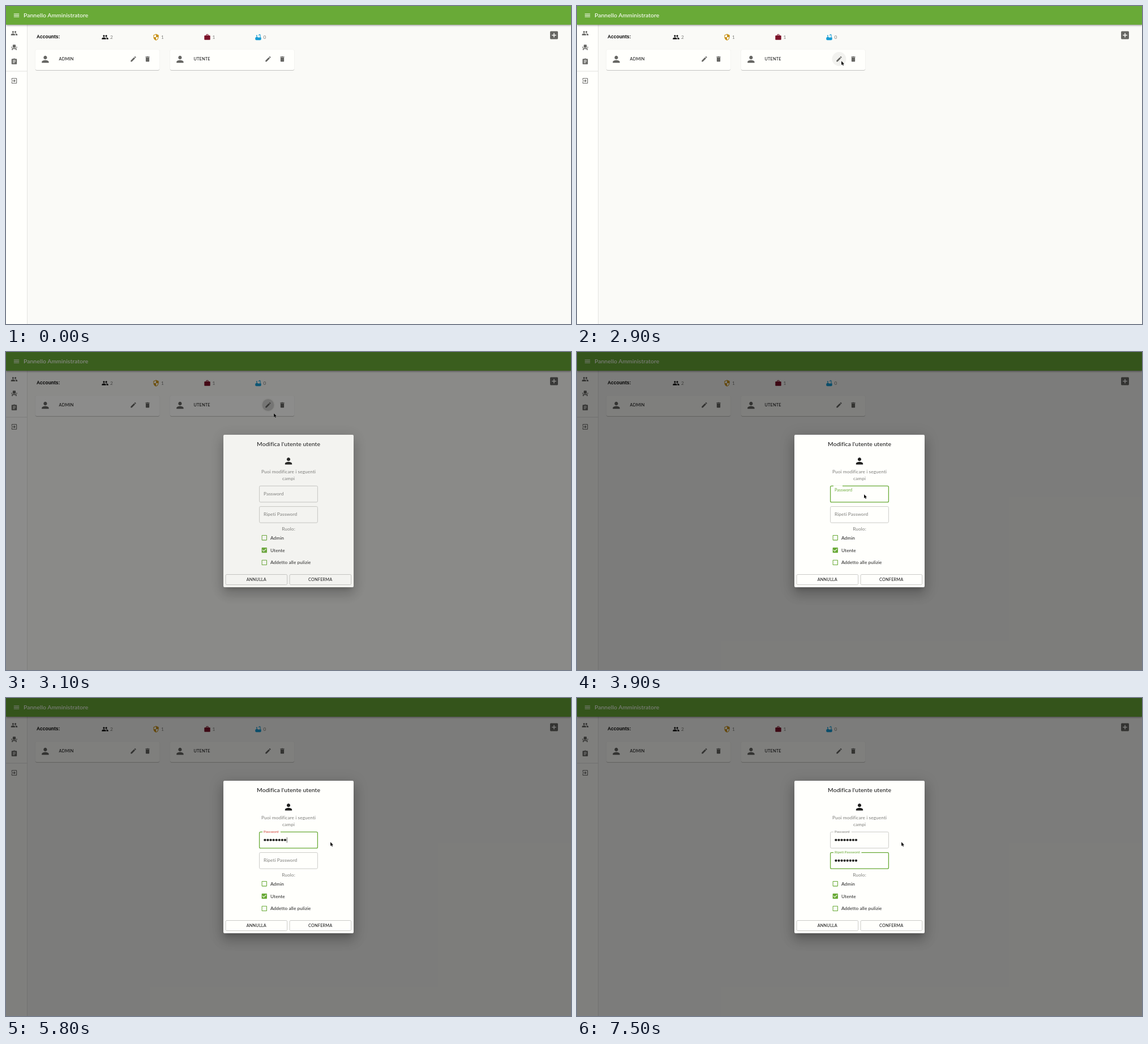
Recreate the animation shown at these times as an HTML page. Size 998 px wide and 561 px high, loop 8 s.

```html
<!DOCTYPE html>
<html lang="it">
<head>
<meta charset="utf-8">
<title>Pannello Amministratore</title>
<style>
html, body { margin: 0; width: 100%; height: 100%; overflow: hidden; background: #fafaf7; }
#stage { position: absolute; left: 0; top: 0; width: 998px; height: 561px; overflow: hidden; }
#stage div, #stage svg { position: absolute; }
svg { left: 0; top: 0; width: 998px; height: 561px; }
text { font-family: Lato, sans-serif; font-size: 8.32px; letter-spacing: .00938em; fill: #202020; white-space: pre; }
.h6 { font-size: 10.4px; font-weight: 500; letter-spacing: .0075em; }
.btn { font-size: 7.28px; font-weight: 500; letter-spacing: .02857em; }
.soft { fill: #7d7d7a; }
.mid { text-anchor: middle; }
#side { left: 0; top: 33px; width: 37px; height: 528px; background: #fffffc; border-right: 1px solid #e4e4e1; }
#bar { left: 0; top: 0; width: 998px; height: 33.3px; background: #69aa37;
  box-shadow: 0 1px 2px -.5px #0003, 0 2px 2.6px #00000024, 0 .5px 5px #0000001f; }
.card { top: 77px; width: 219px; height: 36px; border-radius: 2px; background: #fffffc;
  box-shadow: 0 1px .5px -.5px #0003, 0 .5px .5px #00000024, 0 .5px 1.6px #0000001f; }
#dim { left: 0; top: 0; width: 998px; height: 560.5px; background: rgba(0, 0, 0, .5); }
#dialog { left: 0; top: 0; width: 998px; height: 561px; }
#paper { left: 383.7px; top: 146px; width: 230.7px; height: 269px; border-radius: 2px; background: #fffffc;
  box-shadow: 0 5.7px 7.8px -3.6px #0003, 0 12.5px 19.8px 1.6px #00000024, 0 4.7px 24px 4.2px #0000001f; }
</style>
</head>
<body>
<div id="stage">
  <div id="side"></div>
  <div class="card" style="left:52px"></div>
  <div class="card" style="left:290px"></div>
  <div id="bar"></div>
  <svg id="page">
    <circle id="hover" cx="463" cy="93.5" r="12.5"/>
    <circle id="ripple" cx="463" cy="93.5"/>
    <path d="M0 115H37" stroke="#e0e0dd"/>
  </svg>
  <div id="dim"></div>
  <div id="dialog"><div id="paper"></div><svg id="form"></svg></div>
  <svg><path id="cursor" d="M0 0V7.2L1.7 5.7L2.8 8.2L4.1 7.6L3 5.2H5.2Z" fill="#000" stroke="#fff" stroke-opacity=".6" stroke-width=".35"/></svg>
</div>
<script>
const ICONS = {
  menu: 'M3 18h18v-2H3zm0-5h18v-2H3zm0-7v2h18V6z',
  people: 'M16 11c1.66 0 2.99-1.34 2.99-3S17.66 5 16 5c-1.66 0-3 1.34-3 3s1.34 3 3 3zm-8 0c1.66 0 2.99-1.34 2.99-3S9.66 5 8 5C6.34 5 5 6.34 5 8s1.34 3 3 3zm0 2c-2.33 0-7 1.17-7 3.5V19h14v-2.5c0-2.33-4.67-3.5-7-3.5zm8 0c-.29 0-.62.02-.97.05 1.16.84 1.97 1.97 1.97 3.45V19h6v-2.5c0-2.33-4.67-3.5-7-3.5z',
  seat: 'M4 18v3h3v-3h10v3h3v-6H4zm15-8h3v3h-3zM2 10h3v3H2zm15 3H7V5c0-1.1.9-2 2-2h6c1.1 0 2 .9 2 2z',
  list: 'M19 3h-4.18C14.4 1.84 13.3 1 12 1c-1.3 0-2.4.84-2.82 2H5c-1.1 0-2 .9-2 2v14c0 1.1.9 2 2 2h14c1.1 0 2-.9 2-2V5c0-1.1-.9-2-2-2zm-7 0c.55 0 1 .45 1 1s-.45 1-1 1-1-.45-1-1 .45-1 1-1zm2 14H7v-2h7zm3-4H7v-2h10zm0-4H7V7h10z',
  exit: 'M10.09 15.59L11.5 17l5-5-5-5-1.41 1.41L12.67 11H3v2h9.67zM19 3H5c-1.11 0-2 .9-2 2v4h2V5h14v14H5v-4H3v4c0 1.1.89 2 2 2h14c1.1 0 2-.9 2-2V5c0-1.1-.9-2-2-2z',
  shield: 'M12 1L3 5v6c0 5.55 3.84 10.74 9 12 5.16-1.26 9-6.45 9-12V5zm0 10.99h7c-.53 4.12-3.28 7.79-7 8.94V12H5V6.3l7-3.11z',
  work: 'M20 6h-4V4c0-1.11-.89-2-2-2h-4c-1.11 0-2 .89-2 2v2H4c-1.11 0-1.99.89-1.99 2L2 19c0 1.11.89 2 2 2h16c1.11 0 2-.89 2-2V8c0-1.11-.89-2-2-2zm-6 0h-4V4h4z',
  tub: 'M5 7a2 2 0 1 0 4 0a2 2 0 1 0-4 0M20 13V4.83C20 3.27 18.73 2 17.17 2c-.75 0-1.47.3-2 .83l-1.25 1.25c-.16-.05-.33-.08-.51-.08-.4 0-.77.12-1.08.32l2.76 2.76c.2-.31.32-.68.32-1.08 0-.18-.03-.34-.07-.51l1.25-1.25c.15-.15.36-.24.58-.24.46 0 .83.37.83.83V13h-6.85c-.3-.21-.57-.45-.82-.72l-1.4-1.55c-.19-.21-.43-.38-.69-.5-.31-.15-.65-.23-1-.23C6 10.01 5 11.01 5 12.25V13H2v6c0 1.1.9 2 2 2 0 .55.45 1 1 1h14c.55 0 1-.45 1-1 1.1 0 2-.9 2-2v-6z',
  add: 'M19 3H5c-1.11 0-2 .9-2 2v14c0 1.1.89 2 2 2h14c1.1 0 2-.9 2-2V5c0-1.1-.9-2-2-2zm-2 10h-4v4h-2v-4H7v-2h4V7h2v4h4z',
  person: 'M12 12c2.21 0 4-1.79 4-4s-1.79-4-4-4-4 1.79-4 4 1.79 4 4 4zm0 2c-2.67 0-8 1.34-8 4v2h16v-2c0-2.66-5.33-4-8-4z',
  edit: 'M3 17.25V21h3.75L17.81 9.94l-3.75-3.75zM20.71 7.04c.39-.39.39-1.02 0-1.41l-2.34-2.34c-.39-.39-1.02-.39-1.41 0l-1.83 1.83 3.75 3.75z',
  trash: 'M6 19c0 1.1.9 2 2 2h8c1.1 0 2-.9 2-2V7H6zM19 4h-3.5l-1-1h-5l-1 1H5v2h14z',
  box: 'M19 5v14H5V5h14m0-2H5c-1.1 0-2 .9-2 2v14c0 1.1.9 2 2 2h14c1.1 0 2-.9 2-2V5c0-1.1-.9-2-2-2z',
  checked: 'M19 3H5c-1.11 0-2 .9-2 2v14c0 1.1.89 2 2 2h14c1.11 0 2-.9 2-2V5c0-1.1-.89-2-2-2zm-9 14l-5-5 1.41-1.41L10 14.17l7.59-7.59L19 8z'
};
const GREEN = '#69aa37', RED = '#d5433c', GREY = '#7d7d7a', LINE = '#c6c6c2', DARK = '#666663', INK = '#20201f';
const $ = id => document.getElementById(id);
const page = $('page'), form = $('form');

function set(el, attrs) {
  for (const k in attrs) el.setAttribute(k, attrs[k]);
  return el;
}
function add(parent, tag, attrs, content = '') {
  const el = set(document.createElementNS('http://www.w3.org/2000/svg', tag), attrs);
  el.textContent = content;
  return parent.appendChild(el);
}
const text = (parent, x, y, str, cls = '') => add(parent, 'text', { x, y, class: cls }, str);
const icon = (parent, name, cx, cy, fill, s = .52) =>
  add(parent, 'path', { d: ICONS[name], fill, transform: `translate(${cx} ${cy}) scale(${s}) translate(-12 -12)` });

// Page
icon(page, 'menu', 18.5, 16.5, '#fffffc');
text(page, 31, 19.8, 'Pannello Amministratore', 'h6').style.fill = '#fffffc';
[['people', 48], ['seat', 73], ['list', 98], ['exit', 132]].forEach(([name, y]) => icon(page, name, 14.5, y, DARK));
const head = text(page, 54, 57.4, 'Accounts:');
head.style.cssText = 'font-family:"Liberation Sans",sans-serif;font-weight:700;fill:#000';
[['people', 175, '#111', 2], ['shield', 265, '#c8921a', 1], ['work', 355.5, '#7b1128', 1], ['tub', 445.5, '#159cd5', 0]]
  .forEach(([name, x, color, n]) => {
    icon(page, name, x, 55, color);
    text(page, x + 9, 58, n, 'soft');
  });
icon(page, 'add', 968, 51.5, DARK, .77);
[[52, 'ADMIN'], [290, 'UTENTE']].forEach(([x, name]) => {
  icon(page, 'person', x + 17.4, 94, DARK, .77);
  text(page, x + 41.5, 95.6, name, 'btn');
  icon(page, 'edit', x + 173, 93.5, DARK);
  icon(page, 'trash', x + 198, 93.5, DARK);
});

// Dialog
text(form, 499, 165.6, "Modifica l'utente utente", 'h6 mid');
icon(form, 'person', 499, 192.3, INK, .77);
text(form, 499, 213.6, 'Puoi modificare i seguenti', 'soft mid');
text(form, 499, 226.1, 'campi', 'soft mid');
text(form, 499, 315.3, 'Ruolo:', 'soft mid');
[['Admin', 327.7], ['Utente', 349.6], ['Addetto alle pulizie', 371.4]].forEach(([label, y], i) => {
  icon(form, i === 1 ? 'checked' : 'box', 456.3, y, GREEN);
  text(form, 467, y + 2.9, label);
});
[['ANNULLA', 388], ['CONFERMA', 501]].forEach(([label, x]) => {
  add(form, 'rect', { x, y: 392.5, width: 108.7, height: 18, rx: 2, fill: 'none', stroke: LINE, 'stroke-width': .9 });
  text(form, x + 54.3, 403.6, label, 'btn mid');
});

function makeField(label, top, gap) {
  const frame = add(form, 'rect', { x: 447.6, y: top, width: 102.8, height: 28.6, rx: 2, fill: 'none' });
  const notch = add(form, 'rect', { x: 453, y: top - 1, height: 2, fill: '#fffffc' });
  const name = text(form, 455, 0, label);
  const dots = Array.from({ length: 8 }, (_, i) =>
    add(form, 'circle', { cx: 457.4 + i * 5.08, cy: top + 14.2, r: 2.1, fill: INK }));
  const caret = add(form, 'rect', { y: top + 9.5, width: .7, height: 9.5, fill: INK });
  return ({ up, focus, count, color, blink }) => {
    set(frame, { stroke: focus ? GREEN : LINE, 'stroke-width': focus ? 1.3 : .9 });
    set(notch, { width: gap * up });
    set(name, { y: top + 16.7 - 15 * up });
    name.style.fontSize = 8.32 - 2.08 * up + 'px';
    name.style.fill = color;
    dots.forEach((d, i) => set(d, { opacity: +(i < count) }));
    set(caret, { x: 455.2 + count * 5.08, opacity: +blink });
  };
}
const first = makeField('Password', 236.3, 32);
const second = makeField('Ripeti Password', 272.6, 49.5);

// Timeline
const PATH = [
  [1300, 985, 545], [1500, 880, 450], [1700, 750, 330], [1900, 650, 235], [2100, 581, 167],
  [2300, 520, 128], [2500, 480, 104], [2700, 467, 97], [3000, 467, 97], [3100, 473, 108],
  [3300, 492, 165], [3500, 505, 225], [3700, 505, 250], [3900, 507, 251], [4100, 545, 253], [4300, 573, 254]
];
const FADE = [[2900, 0], [3000, .28], [3100, .9], [3200, 1]];
const HOVER = [[2500, 0], [2700, .05], [3000, .05], [3200, 0]];
const RIPPLE = [[2900, 0, 4], [3000, .12, 8], [3100, .14, 10.5], [3200, .12, 11], [3600, 0, 11.5]];
const KEYS1 = [5000, 5100, 5200, 5300, 5500, 5600, 5700, 5800];
const KEYS2 = [6400, 6500, 6600, 6700, 6800, 6900, 7000, 7200];
const FOCUS1 = 3800, FOCUS2 = 6200, MATCH = 7200;

const clamp = v => Math.max(0, Math.min(1, v));
const typed = (keys, t) => keys.filter(k => k <= t).length;
function at(track, t) {
  const i = track.findIndex(p => p[0] > t);
  if (i === 0) return track[0].slice(1);
  if (i < 0) return track[track.length - 1].slice(1);
  const a = track[i - 1], b = track[i], k = (t - a[0]) / (b[0] - a[0]);
  return a.slice(1).map((v, n) => v + (b[n + 1] - v) * k);
}

function draw(t) {
  const [x, y] = at(PATH, t), [fade] = at(FADE, t), [glow] = at(HOVER, t), [wave, r] = at(RIPPLE, t);
  set($('cursor'), { transform: `translate(${x} ${y})`, opacity: +(t >= 1300) });
  set($('hover'), { opacity: glow });
  set($('ripple'), { opacity: wave, r });
  $('dim').style.opacity = $('dialog').style.opacity = fade;

  const n1 = typed(KEYS1, t), n2 = typed(KEYS2, t), on1 = t >= FOCUS1 && t < FOCUS2, on2 = t >= FOCUS2;
  const wrong = n1 > 0 && t < MATCH;
  first({ up: clamp((t - FOCUS1) / 200), focus: on1, count: n1, blink: on1 && n1,
    color: wrong ? RED : on1 ? GREEN : GREY });
  second({ up: clamp((t - FOCUS2) / 200), focus: on2, count: n2, blink: on2 && t < 7300,
    color: !on2 ? GREY : n2 && t < MATCH + 100 ? RED : GREEN });
}

const start = performance.now();
function tick() {
  const t = (performance.now() - start) % 8000;
  draw(Math.floor(t / 100) * 100);
  requestAnimationFrame(tick);
}
tick();
</script>
</body>
</html>
```
